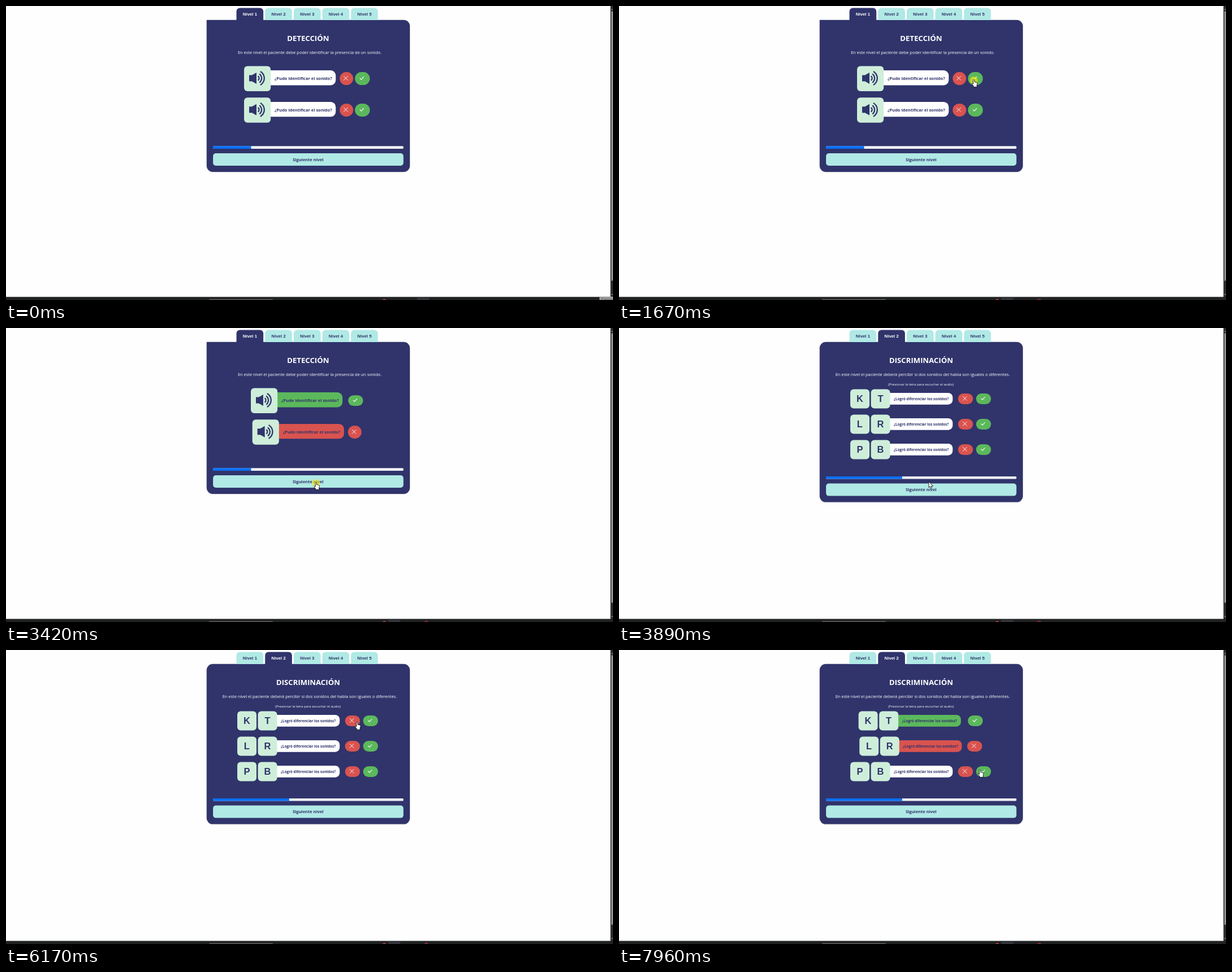
Write an HTML page with a canvas that moves like this. It is 1076 px wide and 521 px high and loops after 8000 ms.

```html
<!DOCTYPE html>
<html lang="es">
<head>
<meta charset="utf-8">
<title>Niveles</title>
<style>
html, body { margin: 0; width: 100%; height: 100%; overflow: hidden; background: #fefefe; }
canvas { display: block; width: 1076px; height: 521px; }
</style>
</head>
<body>
<canvas id="stage"></canvas>
<script>
const W = 1076, H = 521, LOOP = 8000, CLICK = 150;
const NAVY = '#30346b', TEAL = '#b0e9e5', MINT = '#ceeeda';
const RED = '#d9534f', GREEN = '#5cb85c', WHITE = '#fff';
const SANS = '"Open Sans", "Noto Sans", sans-serif';
const ARIAL = '"Liberation Sans", Arial, sans-serif';

const canvas = document.getElementById('stage');
const dpr = window.devicePixelRatio || 1;
canvas.width = W * dpr;
canvas.height = H * dpr;
const ctx = canvas.getContext('2d');

// Each move glides the pointer to a place; some end with a click
const move = (from, to, x, y, click = false) => ({ from, to, x, y, click });
const enter = move(70, 880, 603, 148);
const passSound = move(950, 1570, 629, 130, true);
const failSound = move(2030, 2450, 600, 181, true);
const nextLevel = move(2700, 3410, 549.5, 273, true);
const toR = move(3860, 4630, 466.5, 168);
const toT = move(4740, 5080, 463, 124, true);
const passPair = move(5230, 6400, 640, 128, true);
const failPair = move(6570, 7130, 613, 171, true);
const toLast = move(7300, 7900, 640, 212);
const moves = [enter, passSound, failSound, nextLevel, toR, toT, passPair, failPair, toLast];

const clicked = (m, t) => t >= m.to + CLICK;
const clicking = (m, t) => m.click && t >= m.to && !clicked(m, t);

let hits = [];

function box(x, y, w, h, r, color) {
  ctx.fillStyle = color;
  ctx.beginPath();
  ctx.roundRect(x, y, w, h, r);
  ctx.fill();
}

function hotBox(x, y, w, h, r, color) {
  box(x, y, w, h, r, color);
  hits.push({ x, y, w, h });
}

function text(str, x, y, font, color, align = 'center') {
  ctx.font = font;
  ctx.fillStyle = color;
  ctx.textAlign = align;
  ctx.fillText(str, x, y);
}

function strokeAt(shape, x, y, width, color) {
  ctx.save();
  ctx.translate(x, y);
  ctx.lineCap = ctx.lineJoin = 'round';
  ctx.lineWidth = width;
  ctx.strokeStyle = color;
  ctx.stroke(shape);
  ctx.restore();
}

const crossShape = new Path2D('M-3.5-3.5L3.5 3.5M3.5-3.5L-3.5 3.5');
const checkShape = new Path2D('M-3.2 .2L-.9 2.4L3.2-2.3');
const cone = new Path2D('M0-5.5H5L13-10V10L5 5.5H0Z');
const arrow = new Path2D('M0 0V10.2L2.3 8.2L4 12L5.7 11.2L4.1 7.6H7.2Z');
const hand = new Path2D('M-1.2 1Q0 -.6 1.2 1V4.6L5 5.4Q6.4 5.8 6.2 7.3L5.4 10.5V13.6H-.5V12L-3.4 8.4Q-3.6 6.8 -2.2 7.2L-1.2 8Z');

function speaker(x, y) {
  const waves = new Path2D();
  for (let i = 1; i <= 3; i++) {
    const r = 4.6 * i, a = 0.65 + 0.11 * i;
    waves.moveTo(13 + r * Math.cos(a), -r * Math.sin(a));
    waves.arc(13, 0, r, -a, a);
  }
  ctx.save();
  ctx.translate(x, y);
  ctx.fillStyle = NAVY;
  ctx.fill(cone);
  ctx.restore();
  strokeAt(waves, x, y, 2.3, NAVY);
}

function tabs(active) {
  for (let i = 0; i < 5; i++) {
    const x = 408.5 + i * 50.75, on = i === active;
    hotBox(x, 3.5, 47.7, 21.5, [6, 6, 0, 0], on ? NAVY : TEAL);
    text('Nivel ' + (i + 1), x + 23.9, 16.6, `bold 7.8px ${ARIAL}`, on ? WHITE : NAVY);
  }
}

function panel(bottom, level, title, intro) {
  ctx.save();
  ctx.shadowColor = 'rgba(0,0,0,.2)';
  ctx.shadowBlur = 2 * dpr;
  ctx.shadowOffsetY = dpr / 2;
  box(355.7, 24.8, 360.2, bottom - 24.8, [level ? 11 : 0, 11, 11, 11], NAVY);
  ctx.restore();
  tabs(level);
  text(title, 535.5, 61.8, `bold 13.2px ${SANS}`, WHITE);
  text(intro, 538.3, 85, `7.46px ${SANS}`, WHITE);
  box(367, bottom - 45.7, 337.5, 4.6, 1.5, '#f1f2f5');
  box(367, bottom - 45.7, 67.5 * (level + 1), 4.6, [1.5, 0, 0, 1.5], '#0a70f8');
  hotBox(367, bottom - 33, 337.5, 22, 5, TEAL);
  text('Siguiente nivel', 535.5, bottom - 19.2, `bold 7.46px ${SANS}`, NAVY);
}

// answer: '' while open, then 'yes' or 'no'
const labelColor = answer => ({ yes: GREEN, no: RED })[answer] || WHITE;

function noButton(x, y, w, h) {
  hotBox(x, y, w, h, h / 2, RED);
  strokeAt(crossShape, x + w / 2 - 1.2, y + h / 2 - 0.7, 0.9, WHITE);
}

function yesButton(x, y, w, h) {
  hotBox(x, y, w, h, h / 2, GREEN);
  strokeAt(checkShape, x + w / 2 - 1, y + h / 2 - 0.7, 1.1, WHITE);
}

function soundRow(y, answer) {
  // The row stays centred when one button goes
  const dx = { yes: 12, no: 14.7 }[answer] || 0;
  box(468 + dx, y + 7.6, 116.5, 26.4, [0, 9, 9, 0], labelColor(answer));
  hotBox(422 + dx, y, 47.2, 44.5, 6, MINT);
  speaker(431 + dx, y + 21.5);
  text('¿Pudo identificar el sonido?', 476 + dx, y + 24.2, `bold 7.46px ${SANS}`, NAVY, 'left');
  if (answer !== 'yes') noButton(591.5 + dx, y + 10.6, 24, 23);
  if (answer === 'yes') yesButton(618.5 - dx, y + 12.8, 26.5, 18.6);
  if (!answer) yesButton(618.5, y + 10.6, 26.5, 23);
}

function letterRow(y, letters, answer) {
  const dx = { yes: 14.6, no: 16.2 }[answer] || 0;
  box(479.5 + dx, y + 6.4, 112, 20.7, [0, 8, 8, 0], labelColor(answer));
  [...letters].forEach((c, i) => {
    const x = 410 + dx + i * 36.6;
    hotBox(x, y, 34, 34, 6, MINT);
    text(c, x + 16.9, y + 22.4, `bold 16.5px ${ARIAL}`, NAVY);
  });
  text('¿Logró diferenciar los sonidos?', 487 + dx, y + 19.2, `bold 6.4px ${SANS}`, NAVY, 'left');
  if (answer !== 'yes') noButton(601 + dx, y + 7.5, 26.5, 18.8);
  if (answer !== 'no') yesButton(633 - dx, y + 7.5, 26.5, 18.8);
}

function chrome(t) {
  box(1071.5, 0, 4.5, H, 0, '#2b2b2b');
  box(1073, 9, 3, 478, 1.5, '#929292');
  text('▴', 1074.5, 7, '5px "DejaVu Sans", sans-serif', '#9a9a9a');
  text('▾', 1074.5, 513, '5px "DejaVu Sans", sans-serif', '#9a9a9a');
  box(0, 515.5, W, 5.5, 0, '#212224');
  box(360, 519.5, 113, 1.5, 1, '#5d5e60');
  box(t < 1300 ? 729 : 678, 517, 21, 4, 0, '#34353a');
  box(668, 519.5, 5, 3, 1.5, '#dd4a45');
  if (t >= enter.to) box(742, 519, 6, 2, 1, '#8e2a2d');
  if (t < 140) {
    box(1052, 515, 24, 6, 0, '#9b9b9b');
    text('Cerrar', 1055, 523, `7px ${SANS}`, '#444', 'left');
  }
}

function pointerAt(t) {
  let x = 1070, y = 516;
  for (const m of moves) {
    const k = Math.min(1, Math.max(0, (t - m.from) / (m.to - m.from)));
    const ease = k * k * (3 - 2 * k);
    x += (m.x - x) * ease;
    y += (m.y - y) * ease;
  }
  return { x, y };
}

function pointer(t) {
  if (t < enter.from) return;
  const { x, y } = pointerAt(t);
  if (moves.some(m => clicking(m, t))) {
    ctx.fillStyle = 'rgba(255,232,0,.6)';
    ctx.beginPath();
    ctx.arc(x, y + 2, 7, 0, 2 * Math.PI);
    ctx.fill();
  }
  const over = hits.some(b => x >= b.x && x <= b.x + b.w && y >= b.y && y <= b.y + b.h);
  const shape = over ? hand : arrow;
  ctx.save();
  ctx.translate(x, y);
  ctx.fillStyle = WHITE;
  ctx.fill(shape);
  ctx.restore();
  strokeAt(shape, x, y, 0.9, '#111');
}

function draw(t) {
  hits = [];
  ctx.setTransform(dpr, 0, 0, dpr, 0, 0);
  box(0, 0, W, H, 0, '#fefefe');
  if (!clicked(nextLevel, t)) {
    panel(294, 0, 'DETECCIÓN', 'En este nivel el paciente debe poder identificar la presencia de un sonido.');
    soundRow(106.5, clicked(passSound, t) ? 'yes' : '');
    soundRow(162.3, clicked(failSound, t) ? 'no' : '');
  } else {
    panel(308.6, 1, 'DISCRIMINACIÓN', 'En este nivel el paciente deberá percibir si dos sonidos del habla son iguales o diferentes.');
    text('(Presionar la letra para escuchar el audio)', 535.3, 102.1, `6.02px ${SANS}`, WHITE);
    letterRow(108.6, 'KT', clicked(passPair, t) ? 'yes' : '');
    letterRow(153.6, 'LR', clicked(failPair, t) ? 'no' : '');
    letterRow(198.6, 'PB', '');
  }
  chrome(t);
  pointer(t);
}

const start = performance.now();
function tick() {
  draw((performance.now() - start) % LOOP);
  requestAnimationFrame(tick);
}
tick();
</script>
</body>
</html>
```
